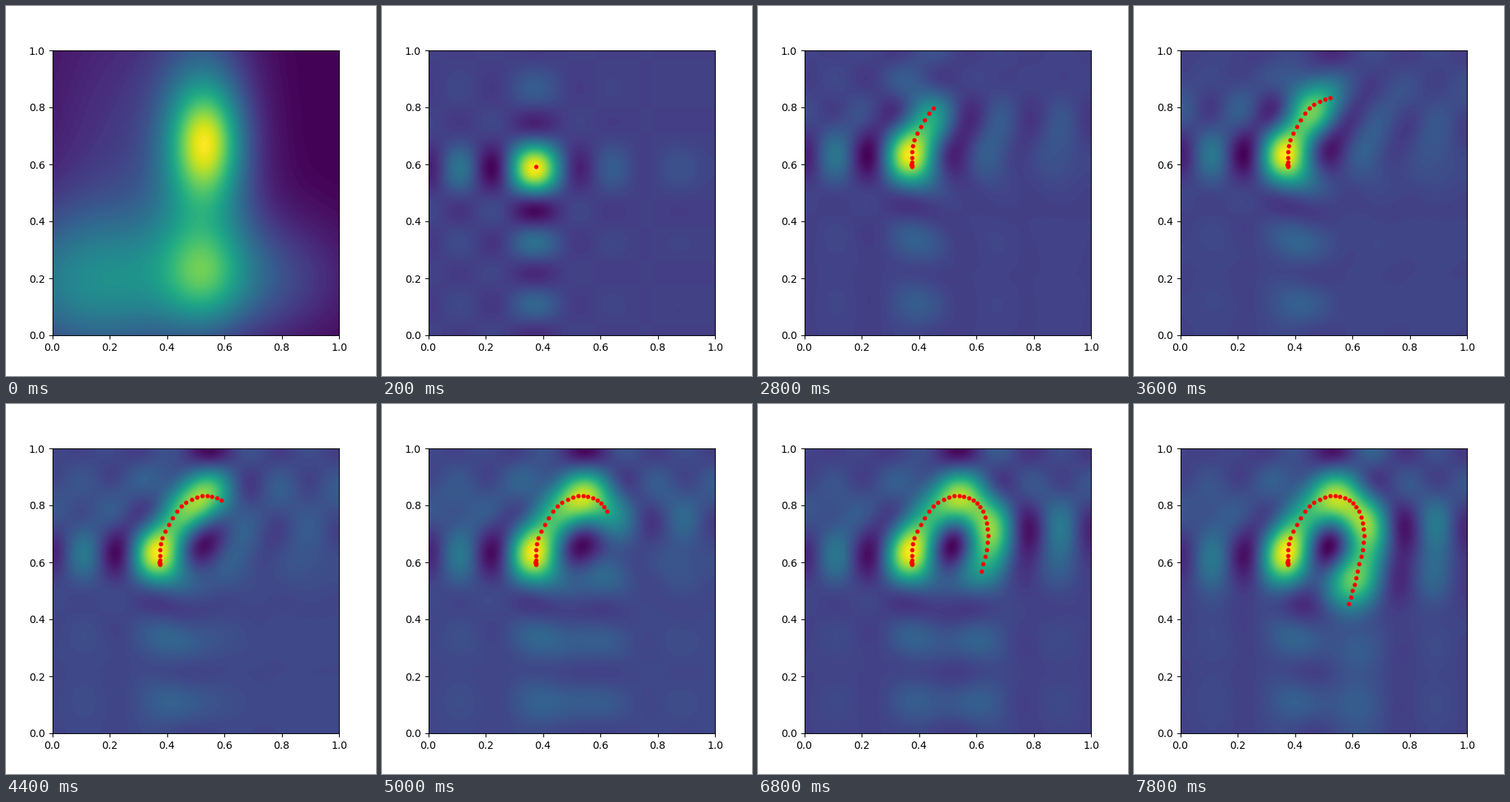
Recreate the animation shown at these times as a matplotlib script. Size 500x500 px, loop 8000 ms.

```python
import numpy as np
import matplotlib.pyplot as plt
from matplotlib.animation import FuncAnimation

FRAMES, INTERVAL = 40, 200
ORDER = 10     # cosine terms per axis
LEVELS = 100

# Steps at which the path passes through its key points
STEPS = np.array([0, 4, 8, 13, 18, 23, 28, 33, 38])
KNOTS = np.array([
    (.3765, .591), (.3745, .609), (.3845, .686), (.450, .797), (.5406, .8345),
    (.614, .794), (.640, .6935), (.618, .570), (.588, .4545),
])

# Amplitude, centre x, centre y, spread x, spread y
BUMPS = [
    (.50, .535, .68, .08, .13),
    (.42, .53, .62, .12, .32),
    (.20, .525, .21, .09, .11),
    (.36, .10, .18, .25, .19),
    (.28, .64, .20, .24, .15),
    (.15, .25, .60, .22, .50),
]


def smooth_path(steps, knots):
    """Cubic Hermite curve through the knots, one point for each step."""
    slopes = np.gradient(knots, steps, axis=0)
    t = np.arange(steps[-1] + 1)
    j = np.clip(np.searchsorted(steps, t, side="right") - 1, 0, len(steps) - 2)
    h = (steps[j + 1] - steps[j])[:, None]
    s = (t - steps[j])[:, None] / h
    ease = s * s * (3 - 2 * s)
    return (knots[j] * (1 - ease) + knots[j + 1] * ease
            + h * s * (1 - s) * (slopes[j] * (1 - s) - slopes[j + 1] * s))


def basis(u):
    """Cosines whose products carry a single 1/norm factor."""
    k = np.arange(ORDER)
    return np.where(k == 0, 1, 2 ** .25) * np.cos(np.pi * np.outer(u, k))


def mixture(x, y):
    return sum(a * np.exp(-((x - mx) / sx) ** 2 / 2 - ((y - my) / sy) ** 2 / 2)
               for a, mx, my, sx, sy in BUMPS)


def coverage(points):
    """Time-averaged density of the visited points in the cosine basis."""
    coef = basis(points[:, 1]).T @ basis(points[:, 0]) / len(points)
    return grid_basis @ coef @ grid_basis.T


axis = np.linspace(0, 1, 100)
gx, gy = np.meshgrid(axis, axis)
grid_basis = basis(axis)
path = smooth_path(STEPS, KNOTS)

fig, ax = plt.subplots(figsize=(5, 5), dpi=100)
dots, = ax.plot([], [], "r.", markersize=6.4)
ax.set(xlim=(0, 1), ylim=(0, 1))


def draw(i):
    for old in list(ax.collections):
        old.remove()
    field = coverage(path[:i]) if i else mixture(gx, gy)
    ax.contourf(gx, gy, field, LEVELS, cmap="viridis")
    dots.set_data(path[:i, 0], path[:i, 1])
    return dots,


anim = FuncAnimation(fig, draw, frames=FRAMES, init_func=lambda: draw(0),
                     interval=INTERVAL, repeat=True, repeat_delay=0)
plt.show()
```
